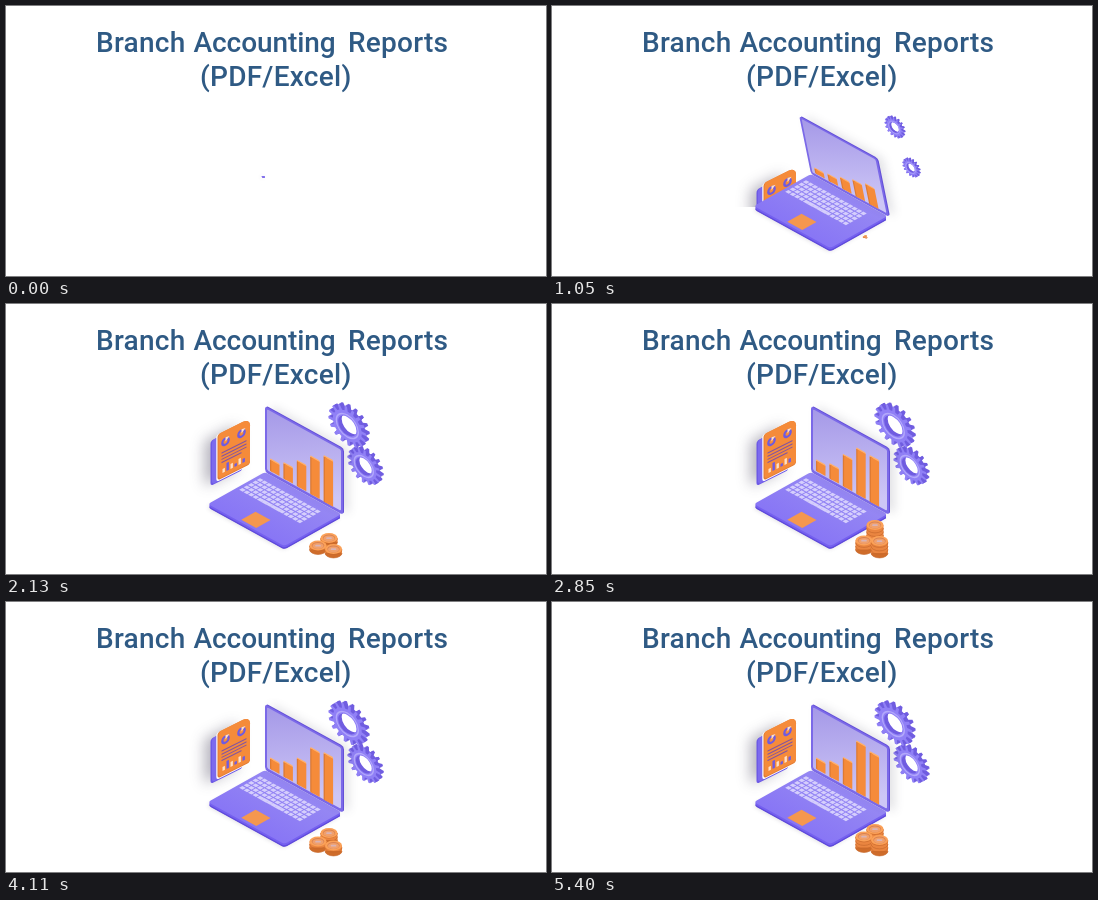
An HTML page with a canvas for the animation above (5.43 s loop, 540 by 270 pixels).

```html
<!DOCTYPE html>
<html lang="en">
<head>
<meta charset="utf-8">
<title>Branch Accounting Reports</title>
<style>
  html, body { margin: 0; width: 100%; height: 100%; overflow: hidden; background: #fff; }
  canvas, svg { position: absolute; left: 0; top: 0; }
  text { font: 500 28px Roboto, "Open Sans", sans-serif; letter-spacing: .25px; fill: #2f5a84; }
  .tight { letter-spacing: -.1px; }
</style>
</head>
<body>
<canvas id="stage" width="540" height="270"></canvas>
<svg width="540" height="270">
  <text y="46"><tspan x="90">Branch</tspan><tspan x="187.5" class="tight">Accounting</tspan><tspan x="342">Reports</tspan></text>
  <text x="194" y="80">(PDF/Excel)</text>
</svg>
<script>
const ctx = document.getElementById('stage').getContext('2d');
const LOOP = 5430, SLOPE = 0.55;
const HINGE = [259, 168], WIDTH = 78, DEPTH = [-57, 32], HEIGHT = 66;

// Five bar heights, then three coin stack heights, at each time
const POSE_TIMES = [2130, 2850, 3630, 4590, 5400];
const POSES = [
  [16, 20, 30, 42, 50, 4, 4, 4],
  [15, 19, 36, 50, 50, 17, 9, 12],
  [14, 19, 31, 55, 52, 6, 8, 7],
  [16, 20, 30, 42, 50, 8, 4, 4],
  [15, 20, 31, 55, 52, 11, 11, 11]
];

const progress = (t, start, span) => Math.min(1, Math.max(0, (t - start) / span));
const easeOut = p => 1 - (1 - p) ** 2;
const smooth = p => p * p * (3 - 2 * p);

function poseAt(t) {
  let i = 0;
  while (i < 3 && t > POSE_TIMES[i + 1]) i++;
  const p = smooth(progress(t, POSE_TIMES[i], POSE_TIMES[i + 1] - POSE_TIMES[i]));
  return POSES[i].map((v, k) => v + (POSES[i + 1][k] - v) * p);
}

function layer(draw) {
  ctx.save();
  draw();
  ctx.restore();
}

function scaled(s, x, y, draw) {
  if (s > 0) layer(() => {
    ctx.translate(x, y);
    ctx.scale(s, s);
    ctx.translate(-x, -y);
    draw();
  });
}

function rect(color, x, y, w, h, r = 0) {
  ctx.fillStyle = color;
  ctx.beginPath();
  ctx.roundRect(x, y, w, h, r);
  ctx.fill();
}

function polygon(color, points) {
  ctx.fillStyle = color;
  ctx.beginPath();
  points.forEach(p => ctx.lineTo(...p));
  ctx.closePath();
  ctx.fill();
}

function ellipse(color, x, y, rx, ry) {
  ctx.fillStyle = color;
  ctx.beginPath();
  ctx.ellipse(x, y, rx, ry, 0, 0, 7);
  ctx.fill();
}

function shade(alpha, blur, dx) {
  ctx.shadowColor = `rgba(70,65,90,${alpha})`;
  ctx.shadowBlur = blur;
  ctx.shadowOffsetX = dx;
}

function base() {
  const slab = (color, dy) => layer(() => {
    ctx.transform(1, SLOPE, DEPTH[0] / 64, DEPTH[1] / 64, HINGE[0], HINGE[1] + dy);
    rect(color, 0, 0, WIDTH - 1.5, 64, 3);
  });
  layer(() => {
    shade(0.2, 4, -1);
    slab('#5f4adb', 3.5);
  });
  for (let dy = 3; dy > 0; dy--) slab(dy > 2 ? '#5f4adb' : '#7560f0', dy);
  const top = ctx.createLinearGradient(0, 0, 0, 64);
  top.addColorStop(0, '#9688f3');
  top.addColorStop(1, '#8876f5');
  slab(top, 0);
  layer(() => {
    ctx.transform(1, SLOPE, ...DEPTH, ...HINGE);
    for (let row = 0; row < 5; row++)
      for (let col = 0; col < 14; col++) {
        const space = row === 4 && col > 3 && col < 9;
        rect('#d5cefc', 3 + col * 4.4, 0.14 + row * 0.077, space ? 4.5 : 3.5, 0.057);
      }
    rect('#f5974f', 31, 0.71, 15, 0.25);
  });
}

function bar(x, bottom, h) {
  rect('#ffb06c', x - 1, bottom + h - 1, 9.5, 2.5, 1);
  rect('#dd7a33', x - 1, bottom, 3, h, 0.5);
  rect('#f58b3a', x + 0.3, bottom, 8.2, h, 0.5);
}

function lid(angle, heights, grow) {
  const cos = Math.cos(angle), sin = Math.sin(angle);
  const up = [DEPTH[0] * cos / HEIGHT, DEPTH[1] * cos / HEIGHT - sin];
  const facing = up[1] < SLOPE * up[0];
  const sheet = (dx, dy) => ctx.transform(1, SLOPE, ...up, HINGE[0] + dx, HINGE[1] + dy);
  layer(() => {
    sheet(1, -0.5);
    if (facing) shade(0.15, 10, 5);
    rect('#6450d8', 0, 0, WIDTH, HEIGHT, 3);
  });
  layer(() => {
    sheet(0, 0);
    rect(facing ? '#7b69e8' : '#8a79f3', 0, 0, WIDTH, HEIGHT, 3);
    if (!facing) return;
    const glass = ctx.createLinearGradient(10, HEIGHT, 50, 0);
    glass.addColorStop(0, '#a69ae8');
    glass.addColorStop(1, '#cdc6f6');
    rect(glass, 2, 3, WIDTH - 4, HEIGHT - 5, 1.5);
    if (grow > 0) heights.slice(0, 5).forEach((h, i) =>
      bar(6 + 13.4 * i, 4 - 0.3 * i, (h - 5) * grow));
  });
}

function report(drop) {
  layer(() => {
    // Only the part above the rear edge of the laptop shows
    ctx.beginPath();
    [[180, 60], [270, 60], [270, 162], [204, 201], [180, 201]].forEach(p => ctx.lineTo(...p));
    ctx.clip();
    const sheet = (x, y) => ctx.transform(1, -0.5, 0, 1, x, y + drop);
    layer(() => {
      sheet(204.5, 137);
      layer(() => {
        shade(0.4, 14, -6);
        rect('#6d59e6', 0, 0, 32, 45, 3);
      });
      rect('#7c6aee', 1.5, 0, 30.5, 44, 3);
    });
    layer(() => {
      sheet(211.5, 130.5);
      rect('#fff', -1.2, 0, 32, 47, 3);
      rect('#e07a33', 0, 0, 32.5, 46, [3, 7, 3, 3]);
      rect('#f58b3a', 1, 0, 31.5, 45, [3, 7, 3, 3]);
      for (const x of [8, 24]) {
        ellipse('#6f5be0', x, 11, 4.3, 4.3);
        ellipse('#f58b3a', x, 11, 2, 2);
        polygon('#ffe0c6', [[x, 11], [x, 6.7], [x + 4, 7.5]]);
      }
      for (let i = 0; i < 4; i++) rect('#85559f', 4, 20 + i * 3.2, i === 3 ? 20 : 25, 1.2);
      [4, 8, 5, 3, 6, 4].forEach((h, i) =>
        rect(i % 2 ? '#6f5be0' : '#ffe0c6', 5 + i * 4, 41 - h, 2.4, h));
    });
  });
}

function gearPath(r, turn) {
  const teeth = 16, step = Math.PI * 2 / teeth;
  ctx.beginPath();
  for (let i = 0; i < teeth; i++)
    [[-0.27, 0.76], [-0.16, 1], [0.16, 1], [0.27, 0.76]].forEach(([off, k]) => {
      const a = turn + (i + off) * step;
      ctx.lineTo(Math.cos(a) * r * k, Math.sin(a) * r * k);
    });
  ctx.closePath();
  ctx.moveTo(r * 0.48, 0);
  ctx.arc(0, 0, r * 0.48, 0, 7);
}

function gear(x, y, r, turn, size) {
  scaled(size, x, y, () => {
    for (let k = 0; k <= 5; k++) layer(() => {
      ctx.transform(1, SLOPE, 0, 1, x + 1.8 - k * 0.7, y - 1 + k * 0.4);
      gearPath(r, turn);
      ctx.fillStyle = k < 5 ? '#705de0' : '#9080f6';
      ctx.fill('evenodd');
      if (k === 5) {
        ctx.beginPath();
        ctx.arc(0, 0, r * 0.58, 0, 7);
        ctx.strokeStyle = '#b3a8fb';
        ctx.lineWidth = 1.3;
        ctx.stroke();
      }
    });
  });
}

function coins(x, y, h) {
  const rx = 8.5, ry = 4.9;
  ellipse('#cf6c2a', x, y, rx, ry);
  rect('#ea8540', x - rx, y - h, rx * 2, h);
  ctx.lineWidth = 0.7;
  ctx.strokeStyle = '#c7692d';
  for (let d = 0; d < h; d += 3.5) {
    ctx.beginPath();
    ctx.ellipse(x, y - d, rx, ry, 0, 0, Math.PI);
    ctx.stroke();
  }
  ellipse('#fba158', x, y - h, rx, ry);
  ellipse('#d98252', x, y - h, 6.2, 3.5);
  ellipse('#f0a06c', x, y - h + 0.4, 5.5, 3);
  rect('#d9b3b5', x - 2.8, y - h - 0.8, 5.6, 1.9, 0.9);
}

function draw(t) {
  const pose = poseAt(t);
  const size = Math.max(0.025, easeOut(progress(t, 0, 735)));
  const angle = Math.PI / 2 * easeOut(progress(t, 248, 1263));
  const gearSize = progress(t, 720, 650);
  const turn = t / 1000 * 0.7;

  ctx.clearRect(0, 0, 540, 270);
  gear(359.5, 161.5, 16.5, 0.2 - turn * 1.15, gearSize);
  gear(343, 121, 19, turn, gearSize);
  if (t > 800) report(90 * (1 - easeOut(progress(t, 800, 900))));
  scaled(size, 257, 170, () => {
    base();
    lid(angle, pose, easeOut(progress(t, 850, 700)));
  });
  scaled(easeOut(progress(t, 1000, 700)), 312, 229, () => {
    coins(323, 238, pose[5]);
    coins(312, 245.5, pose[6]);
    coins(327.5, 249, pose[7]);
  });
}

const start = performance.now();
function tick() {
  draw((performance.now() - start) % LOOP);
  requestAnimationFrame(tick);
}
tick();
</script>
</body>
</html>
```
